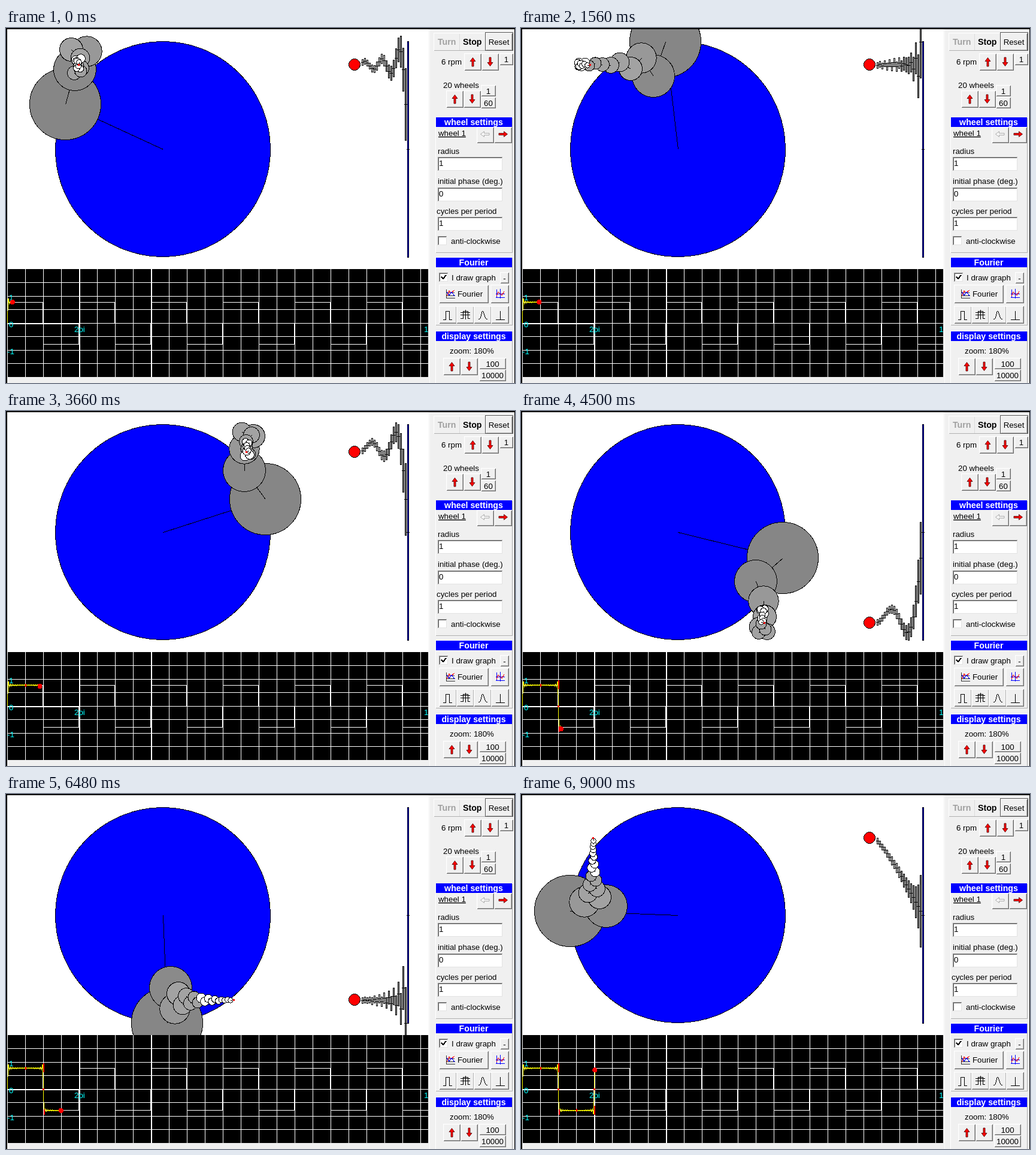
Animation of 850 by 592 pixels, one loop 9060 ms. Source, as an HTML page:

```html
<!DOCTYPE html>
<html lang="en">
<head>
<meta charset="utf-8">
<title>Fourier wheels</title>
<style>
html, body { margin: 0; width: 100%; height: 100%; overflow: hidden; background: #f0f0f0; }
svg { display: block; width: 850px; height: 592px; shape-rendering: crispEdges; }
text { font: 13.3px "Liberation Sans", Arial, sans-serif; white-space: pre; }
.bold { font-weight: bold; font-size: 14.2px; }
</style>
</head>
<body>
<svg id="stage" viewBox="0 0 850 592" xmlns="http://www.w3.org/2000/svg"></svg>
<script>
const LOOP = 9060, STEP = 60, FIRST_STEP = 11;
const WHEELS = 20, RADIUS = 180, CENTER = { x: 262, y: 202.3 };
const AXIS_Y = 492, UNIT = 45, GRAPH_X = 2;
const stage = document.getElementById("stage");
const degreesAt = step => 0.14 + 2.25 * step;

const rect = (x, y, w, h, fill, extra = "") =>
  `<rect x="${x}" y="${y}" width="${w}" height="${h}" fill="${fill}" ${extra}/>`;
const path = (d, stroke = "#000", fill = "none", extra = "") =>
  `<path d="${d}" stroke="${stroke}" fill="${fill}" ${extra}/>`;
const text = (x, y, s, fill = "#000", extra = "") =>
  `<text x="${x}" y="${y}" fill="${fill}" ${extra}>${s}</text>`;

// Two-tone edge: one colour on the top-left, the other on the bottom-right.
const bevel = (x, y, w, h, topLeft, bottomRight) =>
  path(`M${x + .5} ${y + h - .5}V${y + .5}H${x + w - .5}`, topLeft) +
  path(`M${x + .5} ${y + h - .5}H${x + w - .5}V${y + .5}`, bottomRight);
const button = (x, y, w, h, label = "") =>
  rect(x, y, w, h, "#f0f0f0") + bevel(x, y, w, h, "#fff", "#696969") +
  bevel(x + 1, y + 1, w - 2, h - 2, "#f4f4f4", "#b0b0b0") +
  text(x + w / 2, y + h / 2 + 5, label, "#000", 'text-anchor="middle"');
const sunken = (x, y, w, h) =>
  rect(x, y, w, h, "#fff") + bevel(x, y, w, h, "#909090", "#e3e3e3") +
  bevel(x + 1, y + 1, w - 2, h - 2, "#606060", "#fff");
const field = (y, value) => sunken(721, y, 108, 23) + text(723, y + 15, value);
const title = (y, s) => rect(718, y, 127, 16, "#00f") +
  text(781, y + 13, s, "#fff", 'class="bold" text-anchor="middle"');
const group = (y, h) => bevel(717, y, 129, h, "#fff", "#b0b0b0");
const arrow = (x, y, angle, fill = "#f00", stroke = "#400") =>
  path("M0-7.5L4.5-1.5H1.5V7H-1.5V-1.5H-4.5Z", stroke, fill,
    `stroke-width=".8" shape-rendering="auto" transform="translate(${x} ${y}) rotate(${angle})"`);
const arrowPair = (x, y) => button(x, y, 29, 29) + button(x + 29, y, 29, 29) +
  arrow(x + 14.5, y + 15, 0) + arrow(x + 43.5, y + 14, 180);

function controls() {
  return rect(706, 0, 144, 592, "#f0f0f0") + rect(707, 2, 1, 590, "#fafafa") +
    bevel(714, 8, 87, 30, "#fff", "#b0b0b0") + rect(757, 10, 1, 27, "#dcdcdc") +
    text(721, 28, "Turn", "#a0a0a0", 'class="bold"') +
    text(763, 28, "Stop", "#000", 'class="bold"') +
    button(800, 8, 46, 30, "Reset") + path("M800.5 7.5H846.5V37.5H800.5Z", "#555") +
    text(727, 61, "6 rpm") + arrowPair(765, 42) + button(824, 42, 23, 20, "1") +
    text(730, 100, "20 wheels") + arrowPair(735, 104) +
    button(793, 95, 25, 19, "1") + button(793, 115, 25, 19, "60") +

    group(149, 226) + title(149, "wheel settings") +
    text(722, 180, "wheel 1", "#000", 'text-decoration="underline"') +
    button(786, 165, 29, 27) + button(815, 165, 30, 27) +
    arrow(800, 177, -90, "#f8f8f8", "#999") + arrow(830, 177, 90) +
    text(721, 210, "radius") + field(215, "1") +
    text(721, 260, "initial phase (deg.)") + field(266, "0") +
    text(719, 310, "cycles per period") + field(315, "1") +
    sunken(721, 347, 15, 15) + text(743, 360, "anti-clockwise") +

    group(382, 114) + title(383, "Fourier") +
    sunken(723, 408, 15, 15) + path("M727 415L730 418L735 412", "#000", "none", 'stroke-width="2"') +
    text(744, 421, "I draw graph") + button(825, 407, 15, 19, "-") +
    button(723, 428, 83, 31) + text(754, 448, "Fourier") + button(809, 428, 31, 31) +
    path("M735.5 436V450.5H750M735 446.5H750M735 441.5H749", "#333") +
    path("M736 447L740 438L743 442L749 437", "#f00") +
    path("M736 440L740 446L744 440L749 447", "#00f") +
    path("M818 443.5H833M825.5 435V451M818 449.5H833M819.5 436V450", "#00f") +
    path("M819 447L822 440L828 446L832 439", "#f00") +
    [723, 752, 781, 810].map(x => button(x, 463, 30, 30)).join("") +
    path("M730 486.5H734.5V472.5H740.5V486.5H745") +
    path("M759 478.5H775M767.5 470V486M759 484.5H763.5V472.5H771.5V484.5H775M759 474.5H775") +
    path("M789 486C795 486 793 472 796 472S798 486 804 486") +
    path("M818 486.5H833M825.5 486V472") +

    group(505, 90) + title(506, "display settings") + text(741, 543, "zoom: 180%") +
    arrowPair(730, 550) + button(790, 550, 45, 19, "100") + button(790, 569, 45, 20, "10000");
}

function graph() {
  let grid = "", wave = `M2.5 ${AXIS_Y}`;
  for (let x = 2; x < 706; x += 30) grid += `M${x + .5} 402V582`;
  for (let i = 1; i < 8; i++) grid += `M2 ${Math.floor(402 + i * 22.5) + .5}H705`;
  // Each edge steps one pixel to the right where it crosses the axis.
  for (let i = 0; i < 12; i++) {
    const edge = 61.5 + i * 60;
    wave += `V${i % 2 ? 527.5 : 457.5}H${edge}V${AXIS_Y}H${edge + 1}`;
  }
  return rect(2, 402, 703, 180, "#000") + path(grid, "#fff") + path(wave, "#fff") +
    path("M123 402V582M243 402V582M2 492.5H122", "#fff", "none", 'stroke-width="2"') +
    text(5, 454, "1", "#0ff") + text(5, 499, "0", "#0ff") + text(2, 544, "-1", "#0ff") +
    text(114, 507, "2pi", "#0ff") + text(698, 507, "1", "#0ff");
}

const wheelFill = k => k > 9 ? "#fff" : ["#00f", "#868686", "#8a8a8a", "#989898"][k] || "#a2a2a2";
const each = draw => Array.from({ length: WHEELS }, (_, k) => draw(k, RADIUS / (2 * k + 1))).join("");

stage.innerHTML =
  '<clipPath id="view"><rect x="2" y="2" width="704" height="400"/></clipPath>' +
  '<clipPath id="plot"><rect x="2" y="402" width="703" height="180"/></clipPath>' +
  rect(0, 0, 850, 592, "#f0f0f0") + rect(1, 1, 705, 401, "#fff") +
  '<g clip-path="url(#view)">' +
  each((k, r) => `<circle class="wheel" r="${r - .5}" fill="${wheelFill(k)}" stroke="#000"/>` +
    '<path class="spoke" stroke="#000"/>') +
  '<circle id="tip" r="1.5" fill="#f00"/>' +
  each((k, r) => `<g class="bar">${rect(670.5 - 4 * k, -r + .5, 2, 2 * r, wheelFill(k), 'stroke="#000"')}` +
    path(`M${669 - 4 * k} .5H${674 - 4 * k}`) + "</g>") +
  '<circle id="bob" cx="582" r="9.5" fill="#f00" stroke="#000"/></g>' +
  '<g clip-path="url(#plot)">' + graph() + '<path id="trace" stroke="#ff0" fill="none"/>' +
  [[90, "M32 455h2v5h-2z"], [180, "M62 449h2v15h-2zM61 491h3v3h-3z"],
   [180, "M63 526h2v9h-2z"], [270, "M92 525h2v5h-2z"], [360, "M122 520h2v15h-2zM121 491h3v3h-3z"]]
    .map(([from, d]) => path(d, "none", "#f00", `class="mark" data-from="${from}"`)).join("") +
  '<circle id="pen" r="4" fill="#f00"/></g>' + controls() +
  rect(0, 0, 850, 2, "#000") + rect(0, 0, 2, 592, "#000") + rect(849, 0, 1, 592, "#000");

const all = s => [...stage.querySelectorAll(s)];
const [wheels, spokes, bars, marks] = [".wheel", ".spoke", ".bar", ".mark"].map(all);
const [tip, bob, trace, pen] = ["tip", "bob", "trace", "pen"].map(id => document.getElementById(id));
const set = (el, attributes) => {
  for (const name in attributes) el.setAttribute(name, attributes[name]);
};

// Centre of every wheel plus the final tip; odd harmonics alternate in direction.
function chain(degrees) {
  let { x, y } = CENTER;
  const points = [{ x, y }];
  for (let k = 0; k < WHEELS; k++) {
    const n = 2 * k + 1, a = n * degrees * Math.PI / 180;
    x += (k % 2 ? 1 : -1) * RADIUS / n * Math.cos(a);
    y -= RADIUS / n * Math.sin(a);
    points.push({ x, y });
  }
  return points;
}

const samples = Array.from({ length: LOOP / STEP + FIRST_STEP }, (_, i) => {
  const degrees = degreesAt(i);
  return {
    x: GRAPH_X + degrees / 3,
    y: AXIS_Y + (chain(degrees)[WHEELS].y - CENTER.y) * UNIT / RADIUS
  };
});

function draw(step) {
  const degrees = degreesAt(step);
  const points = chain(degrees).map(p => ({ x: Math.round(p.x), y: Math.round(p.y) }));
  for (let k = 0; k < WHEELS; k++) {
    const p = points[k], q = points[k + 1];
    set(wheels[k], { cx: p.x, cy: p.y });
    set(spokes[k], { d: `M${p.x + .5} ${p.y + .5}L${q.x + .5} ${q.y + .5}` });
    set(bars[k], { transform: `translate(0 ${p.y})` });
  }
  const end = points[WHEELS];
  set(tip, { cx: end.x + .5, cy: end.y + .5 });
  set(bob, { cy: end.y });
  const now = samples[step];
  set(pen, { cx: now.x + .5, cy: now.y + .5 });
  set(trace, { d: `M2.5 ${AXIS_Y}L` + samples.slice(0, step + 1).map(s => `${s.x + .5} ${s.y + .5}`).join("L") });
  for (const mark of marks)
    mark.style.display = degrees > mark.dataset.from ? "" : "none";
}

const start = performance.now();
function tick() {
  const time = (performance.now() - start) % LOOP;
  draw(FIRST_STEP + Math.floor(time / STEP));
  requestAnimationFrame(tick);
}
tick();
</script>
</body>
</html>
```
